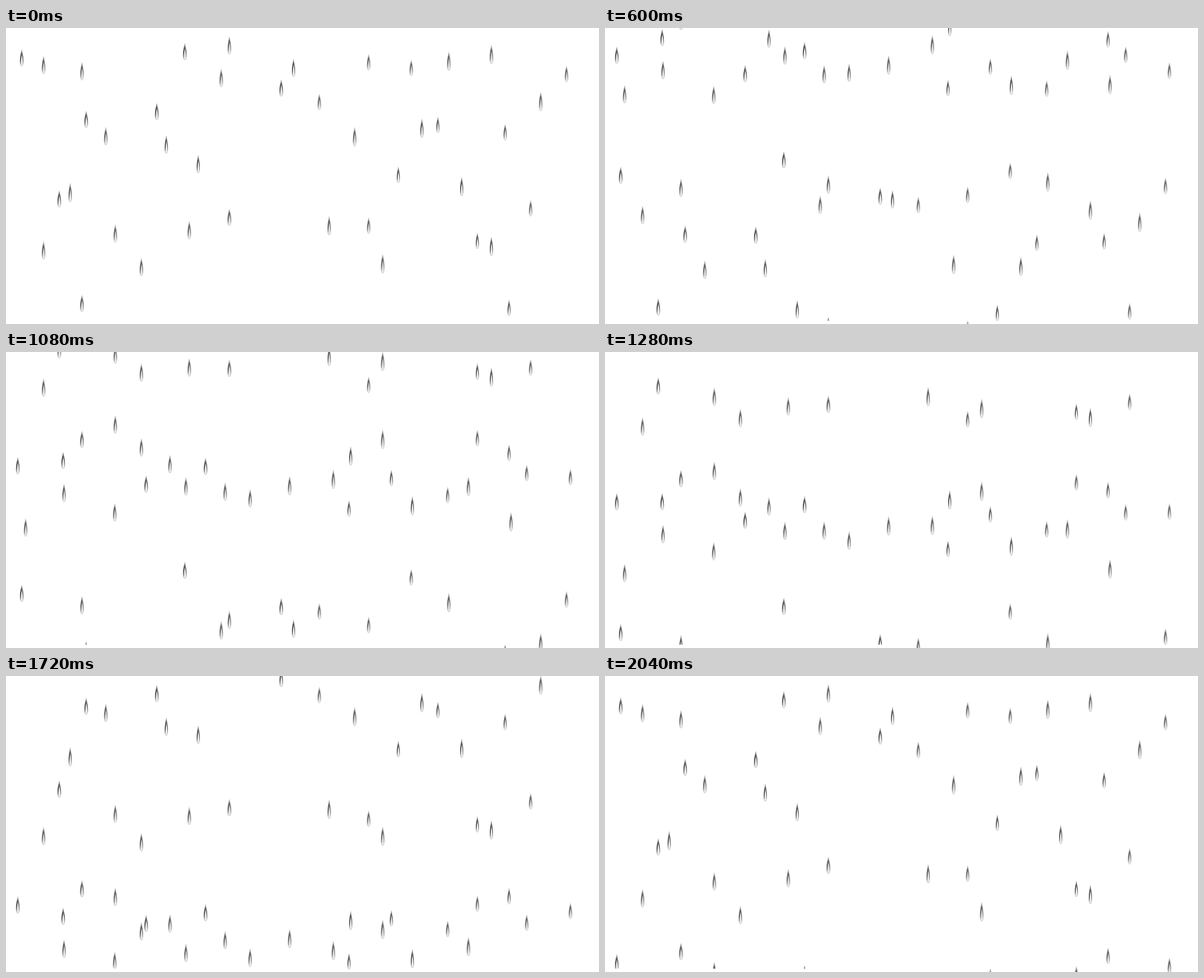
An HTML page without scripts for the animation above (2.08 s loop, 1058 by 529 pixels).

```html
<!DOCTYPE html>
<html lang="en">
<head>
<meta charset="utf-8">
<title>Rain</title>
<style>
  html, body { margin: 0; width: 100%; height: 100%; overflow: hidden; background: #fff; }
  svg { display: block; width: 100%; height: 100%; }
  /* 52 poses; the first and the last are the same, so the loop is seamless */
  .fall { animation: fall 2080ms steps(52, jump-none) -2ms infinite; }
  @keyframes fall { to { transform: translateY(var(--d)); } }
</style>
</head>
<body>
<svg viewBox="0 0 1058 529">
  <defs>
    <linearGradient id="skin" x1="0" y1="0" x2="0" y2="1">
      <stop offset="0" stop-color="#bbb"/>
      <stop offset=".22" stop-color="#777"/>
      <stop offset=".42" stop-color="#606060"/>
      <stop offset=".65" stop-color="#888"/>
      <stop offset=".85" stop-color="#bbb"/>
      <stop offset="1" stop-color="#e4e4e4"/>
    </linearGradient>
    <linearGradient id="edge" gradientUnits="userSpaceOnUse" x1="0" y1="-8" x2="0" y2="13">
      <stop offset="0" stop-color="#444"/>
      <stop offset=".5" stop-color="#222"/>
      <stop offset="1" stop-color="#aaa"/>
    </linearGradient>
    <clipPath id="pane"><path d="M0 0H523V523H0Z"/></clipPath>

    <!-- one drop, 31 high, centred on 0,0 -->
    <g id="drop">
      <path fill="url(#skin)" d="M0-15.5C1-9 3.3-2 3.3 6C3.3 12 2.5 15.5 0 15.5S-3.3 12-3.3 6C-3.3-2-1-9 0-15.5Z"/>
      <path fill="#f4f4f4" d="M.2-5C1.2 0 1.8 5 1.5 13H-1.3C-1.8 5-1 0 .2-5Z"/>
      <path fill="none" stroke="url(#edge)" stroke-width=".9" d="M-.5-8C-1.6-1-2.2 5-1.7 11"/>
    </g>
    <g id="a"><use href="#drop" transform="scale(1.02 1.01)"/></g>
    <g id="b"><use href="#drop" transform="scale(.93 1.08)"/></g>
    <g id="c"><use href="#drop" transform="scale(.9 .97)"/></g>
    <g id="e"><use href="#drop" transform="scale(.92 1.14)"/></g>
  </defs>

  <!-- each group falls its own distance per loop, followed by a copy of itself -->
  <g clip-path="url(#pane)">
    <g class="fall" style="--d:657px">
      <g id="l657">
        <use href="#a" x="95" y="305"/>
        <use href="#a" x="21" y="-145"/>
        <use href="#a" x="250" y="-112"/>
        <use href="#a" x="319" y="42"/>
        <use href="#a" x="398.5" y="338"/>
        <use href="#a" x="491" y="107"/>
      </g>
      <use href="#l657" y="-657"/>
    </g>
    <g class="fall" style="--d:697px">
      <g id="l697">
        <use href="#a" x="143" y="163"/>
        <use href="#a" x="356" y="-165"/>
      </g>
      <use href="#l697" y="-697"/>
    </g>
    <g class="fall" style="--d:709px">
      <g id="l709">
        <use href="#b" x="67" y="397"/>
        <use href="#b" x="135.5" y="77"/>
        <use href="#b" x="194" y="-89"/>
        <use href="#b" x="327" y="361"/>
        <use href="#b" x="391" y="-126"/>
      </g>
      <use href="#l709" y="-709"/>
    </g>
    <g class="fall" style="--d:714px">
      <g id="l714">
        <use href="#a" x="28" y="53"/>
        <use href="#a" x="135.5" y="492"/>
      </g>
      <use href="#l714" y="-714"/>
    </g>
    <g class="fall" style="--d:751px">
      <g id="l751">
        <use href="#a" x="102" y="-204"/>
        <use href="#b" x="103.5" y="-146"/>
        <use href="#a" x="269" y="149"/>
        <use href="#b" x="286" y="208"/>
      </g>
      <use href="#l751" y="-751"/>
    </g>
    <g class="fall" style="--d:771px">
      <g id="l771">
        <use href="#b" x="195" y="367"/>
        <use href="#b" x="292.5" y="-208"/>
        <use href="#b" x="384" y="89"/>
        <use href="#b" x="435.5" y="-147"/>
      </g>
      <use href="#l771" y="-771"/>
    </g>
    <g class="fall" style="--d:799px">
      <g id="l799"><use href="#b" x="513" y="71"/></g>
      <use href="#l799" y="-799"/>
    </g>
    <g class="fall" style="--d:812px">
      <g id="l812">
        <use href="#b" x="178" y="193"/>
        <use href="#b" x="321" y="-190"/>
      </g>
      <use href="#l812" y="-812"/>
    </g>
    <g class="fall" style="--d:830px">
      <g id="l830">
        <use href="#b" x="35" y="-126"/>
        <use href="#b" x="241.5" y="427"/>
      </g>
      <use href="#l830" y="-830"/>
    </g>
    <g class="fall" style="--d:845px">
      <g id="l845">
        <use href="#b" x="195" y="-318"/>
        <use href="#b" x="398.5" y="31"/>
      </g>
      <use href="#l845" y="-845"/>
    </g>
    <g class="fall" style="--d:882px">
      <g id="l882"><use href="#b" x="343" y="243"/></g>
      <use href="#l882" y="-882"/>
    </g>
    <g class="fall" style="--d:911px">
      <g id="l911">
        <use href="#b" x="67" y="66"/>
        <use href="#b" x="241.5" y="-312"/>
      </g>
      <use href="#l911" y="-911"/>
    </g>
    <g class="fall" style="--d:954px">
      <g id="l954"><use href="#e" x="114.5" y="294"/></g>
      <use href="#l954" y="-954"/>
    </g>
  </g>

  <g>
    <g class="fall" style="--d:626px">
      <g id="r626">
        <use href="#c" x="559" y="132"/>
        <use href="#c" x="647" y="353"/>
        <use href="#c" x="723" y="71"/>
        <use href="#c" x="788" y="-76"/>
        <use href="#c" x="936" y="322"/>
        <use href="#c" x="1007" y="-108"/>
      </g>
      <use href="#r626" y="-626"/>
    </g>
    <g class="fall" style="--d:663px">
      <g id="r663">
        <use href="#c" x="687.5" y="-126"/>
        <use href="#c" x="890.5" y="186"/>
      </g>
      <use href="#r663" y="-663"/>
    </g>
    <g class="fall" style="--d:680px">
      <g id="r680">
        <use href="#c" x="897.5" y="500"/>
        <use href="#c" x="1000" y="82"/>
      </g>
      <use href="#r680" y="-680"/>
    </g>
    <g class="fall" style="--d:716px">
      <g id="r716">
        <use href="#c" x="770.5" y="173"/>
        <use href="#c" x="929" y="-163"/>
      </g>
      <use href="#r716" y="-716"/>
    </g>
    <g class="fall" style="--d:734px">
      <g id="r734">
        <use href="#e" x="506" y="-150"/>
        <use href="#e" x="576.5" y="353"/>
        <use href="#c" x="612" y="-109"/>
        <use href="#e" x="725" y="-114"/>
        <use href="#e" x="790" y="59"/>
        <use href="#c" x="841" y="380"/>
        <use href="#e" x="866" y="390"/>
        <use href="#e" x="954" y="131"/>
      </g>
      <use href="#r734" y="-734"/>
    </g>
    <g class="fall" style="--d:776px">
      <g id="r776">
        <use href="#e" x="622" y="194"/>
        <use href="#e" x="825" y="-171"/>
      </g>
      <use href="#r776" y="-776"/>
    </g>
    <g class="fall" style="--d:800px">
      <g id="r800"><use href="#e" x="615" y="-238"/></g>
      <use href="#r800" y="-800"/>
    </g>
    <g class="fall" style="--d:806px">
      <g id="r806">
        <use href="#c" x="647" y="61"/>
        <use href="#c" x="841" y="-273"/>
      </g>
      <use href="#r806" y="-806"/>
    </g>
    <g class="fall" style="--d:839px">
      <g id="r839">
        <use href="#e" x="584" y="-217"/>
        <use href="#c" x="700" y="262"/>
        <use href="#e" x="742" y="179"/>
      </g>
      <use href="#r839" y="-839"/>
    </g>
    <g class="fall" style="--d:860px">
      <g id="r860">
        <use href="#e" x="672" y="421"/>
        <use href="#e" x="901" y="-152"/>
      </g>
      <use href="#r860" y="-860"/>
    </g>
    <g class="fall" style="--d:946px">
      <g id="r946">
        <use href="#e" x="672" y="-345"/>
        <use href="#e" x="866" y="47"/>
      </g>
      <use href="#r946" y="-946"/>
    </g>
    <g class="fall" style="--d:984px">
      <g id="r984"><use href="#e" x="813" y="283"/></g>
      <use href="#r984" y="-984"/>
    </g>
  </g>
</svg>
</body>
</html>
```
